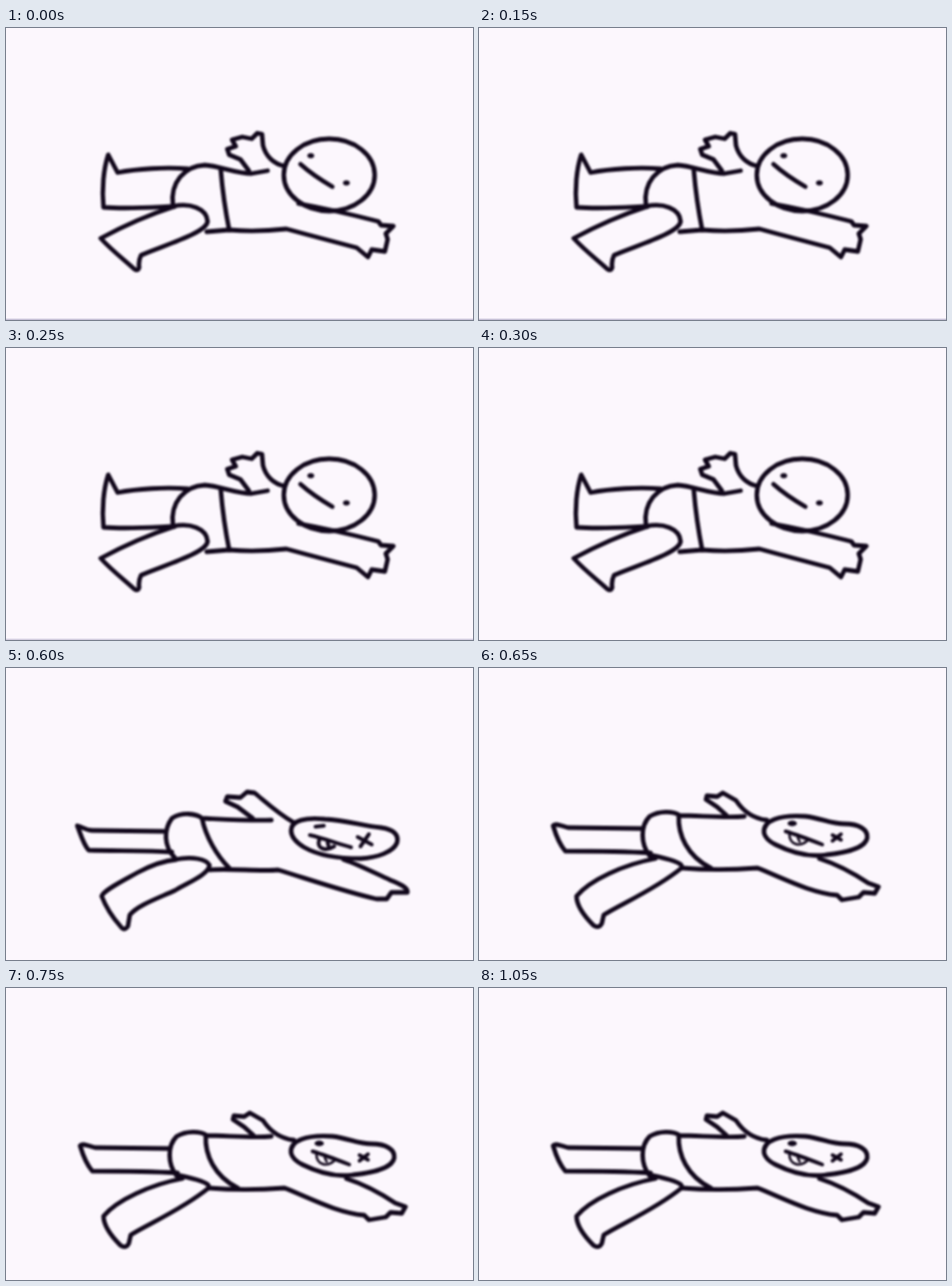
Animation, 498 px wide and 311 px high, one loop 1.25 s. Source, as an HTML page:

```html
<!DOCTYPE html>
<html lang="en">
<head>
<meta charset="utf-8">
<title>Doodle figure</title>
<style>
  html, body { margin: 0; width: 100%; height: 100%; overflow: hidden; background: #fcf7fd; }
  svg { display: block; width: 100%; height: 100%; }
  .pose {
    fill: none; stroke: #10061a; stroke-width: 4.8;
    stroke-linecap: round; stroke-linejoin: round;
    filter: blur(.9px);
    animation: 1250ms step-end infinite;
  }
  .thin { stroke-width: 2.6; }
  .face { stroke-width: 4; }
  .eye { fill: #10061a; stroke: none; }
  .rest { animation-name: rest; }
  .hit { animation-name: hit; }
  .flat { animation-name: flat; }
  .edge { fill: #c6c0d6; animation: edge 1250ms step-end infinite; }
  @keyframes rest { 0% { opacity: 1 } 48%, 100% { opacity: 0 } }
  @keyframes hit { 0% { opacity: 0 } 48% { opacity: 1 } 52%, 100% { opacity: 0 } }
  @keyframes flat { 0% { opacity: 0 } 52%, 100% { opacity: 1 } }
  @keyframes edge { 0% { opacity: 1 } 20% { opacity: .75 } 24%, 100% { opacity: 0 } }
</style>
</head>
<body>
<svg viewBox="0 0 498 311">
  <rect class="edge" y="309.6" width="498" height="1.4"/>

  <g class="pose rest">
    <!-- legs -->
    <path d="M194 150C170 148 140 150 119 154L109 135C104 150 102 172 104 191C130 193 155 191 180 190"/>
    <path d="M178 190C196 186 214 192 215 206C214 218 170 231 144 242Q141 248 142 255Q140 260 136 256C126 247 112 236 101 224C125 211 155 198 180 190"/>
    <!-- body and front arm -->
    <path d="M178 188C175 165 190 147 212 146C228 147 245 155 262 155L279 152M229 151C231 175 234 195 238 215"/>
    <path d="M214 217L238 215C260 217 280 216 299 214C325 221 355 229 374 234L386 244L390 236L404 238L407 225L405 219L413 211L400 210L397 206C370 199 340 192 312 187"/>
    <!-- back arm -->
    <path d="M259 152L250 140L238 135L236 129L245 126L241 119L252 116L262 118L268 112L273 113L274 125C277 137 286 145 297 147"/>
    <ellipse cx="344.7" cy="156.5" rx="48.5" ry="38.5"/>
    <path d="M314 145C324 154 336 162 348 169"/>
    <ellipse class="eye" cx="325" cy="136" rx="3.6" ry="2.8"/>
    <ellipse class="eye" cx="363" cy="165" rx="3.6" ry="2.8"/>
  </g>

  <g class="pose hit">
    <path d="M168 174L92 173C85 173 81 169 76 168C79 175 82 187 88 194C115 195 150 194 177 196"/>
    <path d="M180 204C200 200 214 204 217 210C216 220 195 228 180 237C160 246 140 253 132 263L130 275Q126 281 122 275C114 266 107 256 102 243C104 237 120 229 140 218C155 210 170 205 182 204"/>
    <path d="M180 202C168 190 168 172 177 160C188 153 203 155 209 160C230 161 260 163 283 162M209 160C213 180 225 200 238 213"/>
    <path d="M217 215C240 213 270 217 290 215C320 224 360 238 395 246L406 246L411 239L428 239C429 234 420 230 410 226C395 219 375 209 360 204"/>
    <path d="M263 160L247 148L234 142L236 137L250 138L257 132L265 133C275 141 290 155 306 164"/>
    <path d="M304 173C304 162 320 159 340 161C362 162 380 168 400 170C414 172 419 178 417 186C413 196 396 202 378 203C350 203 332 199 318 191C308 185 304 180 304 173Z"/>
    <path class="face" d="M330 169L339 168M324 178C338 181 353 187 368 191M375 180L390 188M387 177L378 190"/>
    <path class="face" d="M334 183C331 192 340 196 350 190M343 186L344 190"/>
  </g>

  <g class="pose flat">
    <path d="M174 171L95 170C88 168 82 165 79 168C82 178 86 188 92 195C120 195 150 195 183 197"/>
    <path d="M188 203C155 209 118 226 104 243C104 255 114 266 122 274Q128 278 131 272L133 263C150 252 188 236 216 213C219 207 200 203 182 199"/>
    <path d="M182 200C172 187 172 168 182 158C192 152 207 152 214 157C235 157 262 160 283 158M213 157C212 178 222 200 247 213"/>
    <path d="M216 213C240 215 270 215 297 213C325 224 352 239 382 242L387 247L405 244L410 239L422 240L426 233L415 229C400 219 385 210 363 203"/>
    <path d="M264 157L254 148L242 140L243 136L254 137L260 133L274 141C280 150 290 160 307 162"/>
    <path d="M304 176C302 162 322 156 348 158C365 160 375 166 390 166C405 166 415 172 414 181C412 192 390 197 370 199C350 202 330 195 316 188C308 184 305 180 304 176Z"/>
    <path class="face" d="M327 174C340 178 353 183 366 188M377 178L386 183M386 177L377 184"/>
    <path class="thin" d="M331 177C331 187 341 192 350 184M340 181L342 185"/>
    <ellipse class="eye" cx="334" cy="165.5" rx="5" ry="3"/>
  </g>
</svg>
</body>
</html>
```
